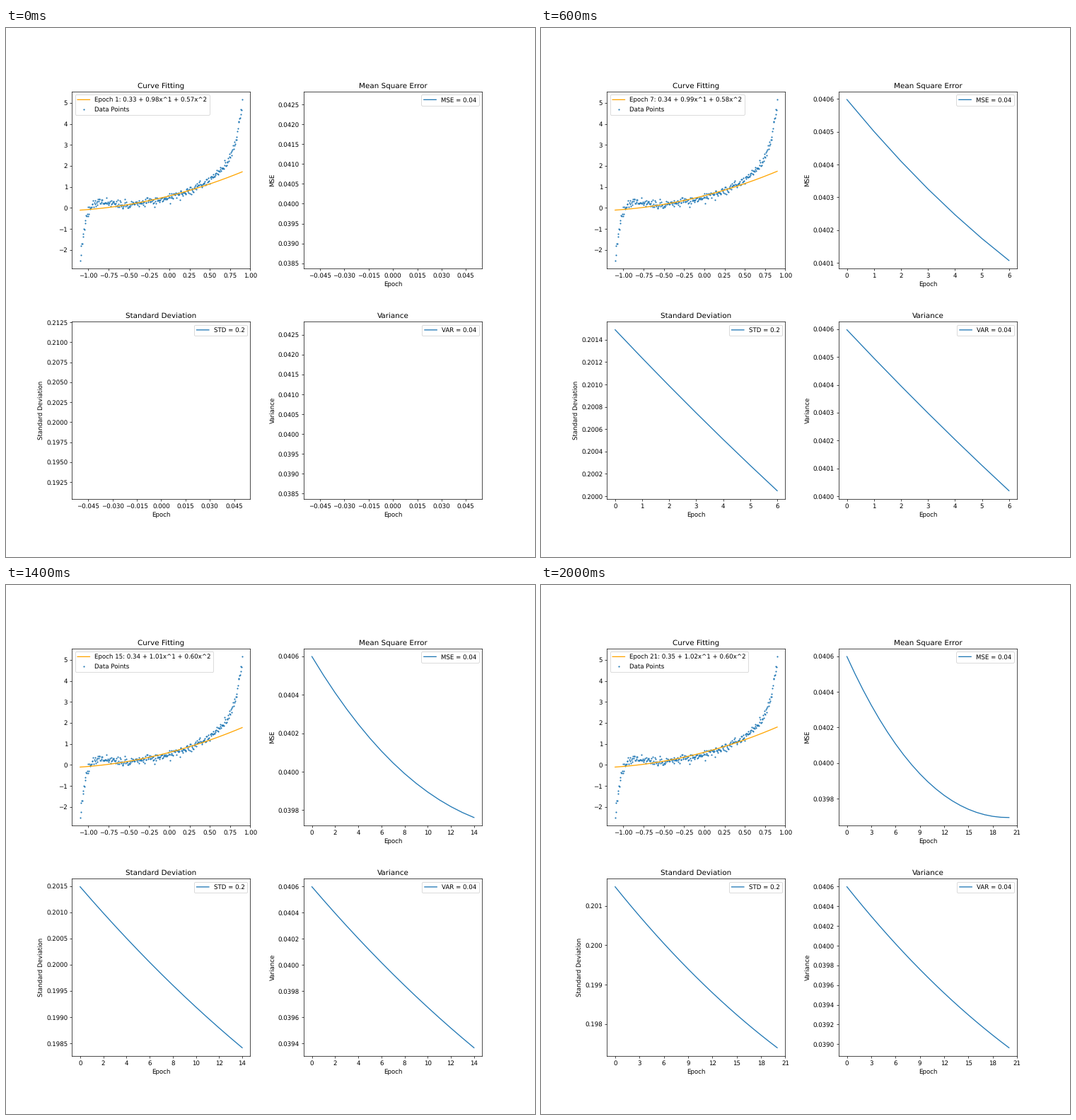
A matplotlib script for the animation above (2.1 s loop, 748 by 748 pixels).

```python
import numpy as np
import matplotlib.pyplot as plt
from matplotlib.animation import FuncAnimation
from matplotlib.ticker import MaxNLocator

SIZE, INCHES = 748, 12
EPOCHS, STEP_MS = 21, 100

plt.rcParams["text.hinting"] = "none"

# Noisy samples of a polynomial that is steep at both ends
rng = np.random.default_rng(4)
x = np.linspace(-1.1, 0.9, 300)
u = x + 0.1
trend = 0.4 + 0.94 * u + 0.9 * u**2 + 1.45 * (u**6 - u**10) + 2.86 * u**13
y = np.clip(trend + rng.normal(0, 0.1, x.size), -2.5, 5.16)

# Training history
n = np.arange(EPOCHS)
std = 0.201489 - 1e-6 * n * (255.94 - 2.681 * n + 0.0062 * n**2)
var = std**2
mse = var[0] - 1e-6 * n * (100.27 - 3.233 * n + 0.0239 * n**2)


def coefs(k):
    return (0.331 + 0.00085 * k,
            0.9775 + 0.0022 * k,
            0.5725 + 0.00175 * k - 0.00001 * k * k)


fig, axes = plt.subplots(2, 2, figsize=(INCHES, INCHES), dpi=SIZE / INCHES)
fig.subplots_adjust(left=0.1248, wspace=0.3, hspace=0.3)
fit_ax, mse_ax, std_ax, var_ax = axes.flat


def add_legend(ax, loc):
    for handle in ax.legend(loc=loc).legend_handles:
        handle.set_snap(False)


def draw_fit(k):
    a, b, c = coefs(k)
    fit_ax.clear()
    fit_ax.plot(x, np.polyval((a, b, c), x), color="orange",
                label=f"Epoch {k + 1}: {a:.2f} + {b:.2f}x^1 + {c:.2f}x^2")
    fit_ax.scatter(x, y, s=2, color="C0", label="Data Points")
    fit_ax.set_ylim(-2.883, 5.543)
    fit_ax.set_title("Curve Fitting")
    add_legend(fit_ax, "upper left")


def draw_history(ax, values, k, title, ylabel, label):
    ax.clear()
    ax.plot(n[:k + 1], values[:k + 1], label=label)
    ax.set_title(title)
    ax.set_xlabel("Epoch")
    ax.set_ylabel(ylabel)
    ax.xaxis.set_major_locator(MaxNLocator(integer=True))
    add_legend(ax, "upper right")


def update(k):
    draw_fit(k)
    draw_history(mse_ax, mse, k, "Mean Square Error", "MSE", "MSE = 0.04")
    draw_history(std_ax, std, k, "Standard Deviation", "Standard Deviation",
                 "STD = 0.2")
    draw_history(var_ax, var, k, "Variance", "Variance", "VAR = 0.04")
    return []


anim = FuncAnimation(fig, update, frames=EPOCHS, interval=STEP_MS,
                     init_func=lambda: update(0), repeat=True, repeat_delay=0)
plt.show()
```
